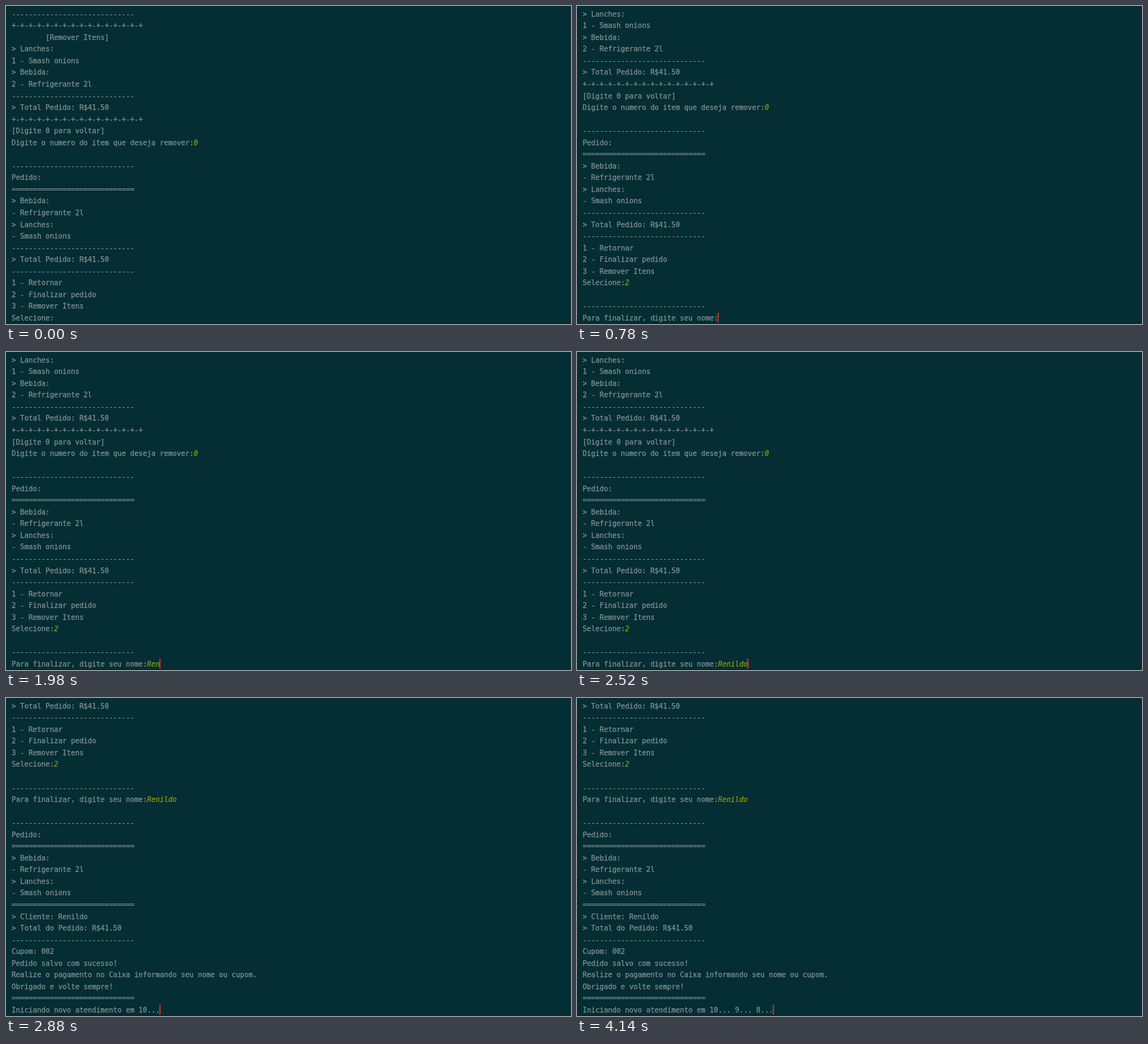
An HTML page that plays this animation: 800 px wide and 450 px high, repeating every 4200 ms.

```html
<!DOCTYPE html>
<html lang="pt">
<head>
<meta charset="utf-8">
<style>
html, body { margin: 0; width: 100%; height: 100%; overflow: hidden; background: #042d34; }
pre {
  position: absolute; left: 8px; top: 3.7px; margin: 0; color: #82908f;
  font: 9.966px/16.54px "DejaVu Sans Mono", "Noto Sans Mono", monospace;
  font-variant-ligatures: none;
  -webkit-text-stroke: .25px;
}
i { color: #8a9c08; }
#caret { position: absolute; top: 434px; height: 14px; background: #a8322f; }
#edge { position: absolute; left: 0; top: 449px; width: 800px; height: 1px; background: #0b252b; }
</style>
</head>
<body>
<pre id="screen"></pre>
<div id="caret"></div>
<div id="edge"></div>
<script>
const LOOP = 4200, ROWS = 27, BLINK = 300;
const NAME = 'Renildo';
const dash = '-'.repeat(29), equal = '='.repeat(29), plus = '+-'.repeat(15) + '+';
const order = `${dash}
Pedido:
${equal}
> Bebida:
- Refrigerante 2l
> Lanches:
- Smash onions
`;

const menu = `${dash}
${plus}
        [Remover Itens]
> Lanches:
1 - Smash onions
> Bebida:
2 - Refrigerante 2l
${dash}
> Total Pedido: R$41.50
${plus}
[Digite 0 para voltar]
Digite o numero do item que deseja remover:<i>0</i>

${order}${dash}
> Total Pedido: R$41.50
${dash}
1 - Retornar
2 - Finalizar pedido
3 - Remover Itens
Selecione:`;

const receipt = `
${order}${equal}
> Cliente: ${NAME}
> Total do Pedido: R$41.50
${dash}
Cupom: 002
Pedido salvo com sucesso!
Realize o pagamento no Caixa informando seu nome ou cupom.
Obrigado e volte sempre!
${equal}
Iniciando novo atendimento em 10...`;

// Each event appends output or typed input at its time.
const typed = text => `<i>${text}</i>`;
const events = [
  [-420, menu],
  [300, typed('2')],
  [660, '\n'],
  [720, `\n${dash}\nPara finalizar, digite seu nome:`],
  ...[...NAME].map((c, k) => [1740 + 120 * k, typed(c)]),
  [2760, '\n'],
  [2820, receipt],
  [3420, ' 9...'],
  [4020, ' 8...']
];

const screen = document.getElementById('screen');
const caret = document.getElementById('caret');
let shown = '';

function draw(t) {
  const past = events.filter(e => e[0] <= t);
  const lines = past.map(e => e[1]).join('').split('\n').slice(-ROWS);
  const html = lines.join('\n');
  if (html !== shown) screen.innerHTML = shown = html;

  // The caret restarts its blink with every event.
  const column = lines.at(-1).replace(/<\/?i>/g, '').length;
  const width = column ? 2 : 1;
  const age = t - past.at(-1)[0];
  caret.style.left = 9 + 6 * column - width + 'px';
  caret.style.width = width + 'px';
  caret.style.visibility = age % (2 * BLINK) < BLINK ? 'visible' : 'hidden';
}

const start = performance.now();
function tick() {
  draw((performance.now() - start) % LOOP);
  requestAnimationFrame(tick);
}
tick();
</script>
</body>
</html>
```
